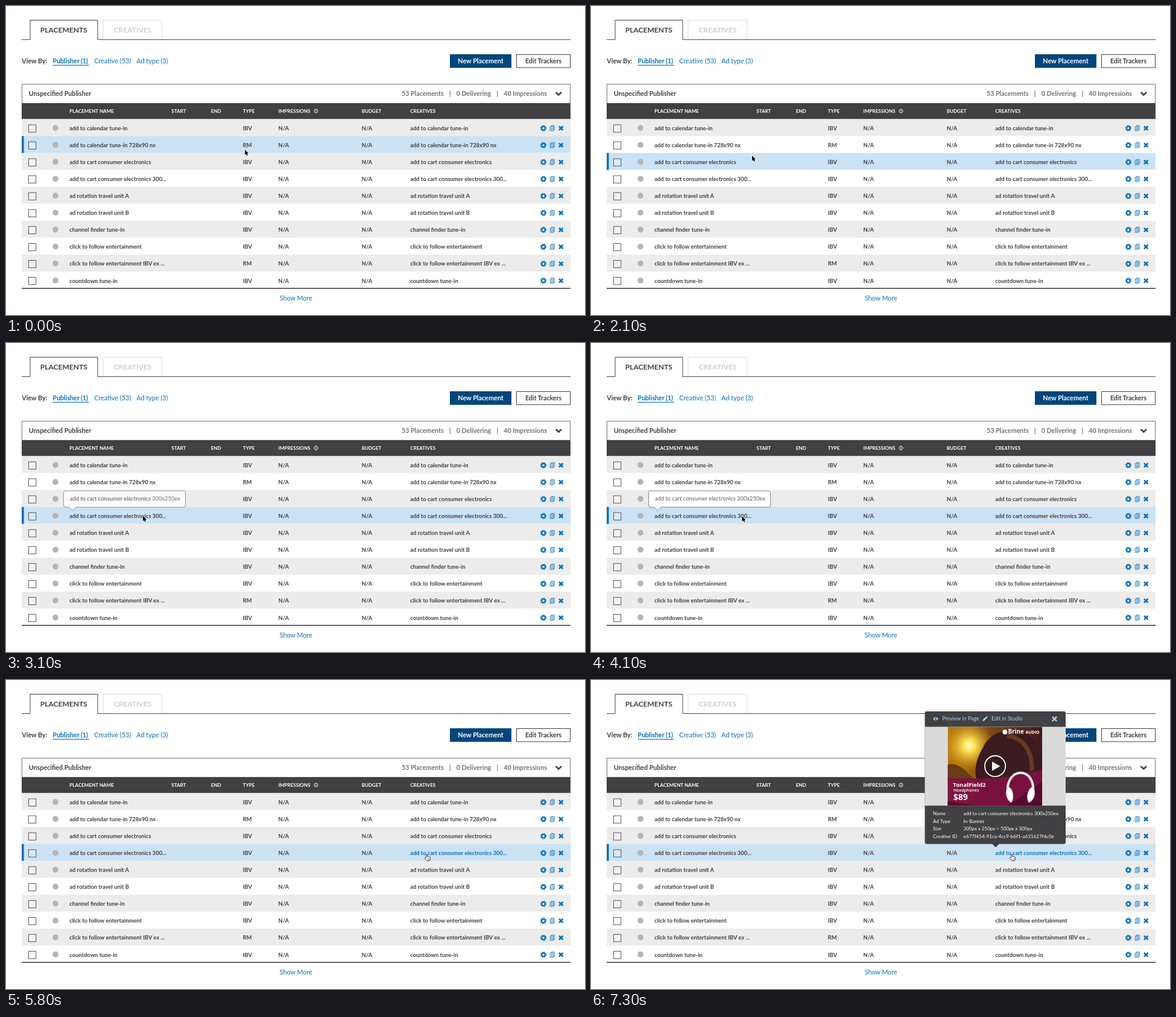
Recreate the animation shown at these times as an HTML page. Size 960 by 512 pixels, loop 7400 ms.

```html
<!DOCTYPE html>
<html lang="en">
<head>
<meta charset="utf-8">
<title>Placements</title>
<style>
html, body { margin: 0; width: 100%; height: 100%; overflow: hidden; background: #fff; }
svg { display: block; width: 960px; height: 512px; font-family: Lato, sans-serif; cursor: default; }
text { white-space: pre; }
.ad { font-family: "Open Sans", sans-serif; }
</style>
</head>
<body>
<svg id="stage" viewBox="0 0 960 512"></svg>
<script>
const INK = '#414042', BLUE = '#0a71b9', SKY = '#a5d4f5';
const TOP = 187.4, PITCH = 28.07, LOOP = 7400;

const names = [
  'add to calendar tune-in', 'add to calendar tune-in 728x90 nx',
  'add to cart consumer electronics', 'add to cart consumer electronics 300...',
  'ad rotation travel unit A', 'ad rotation travel unit B',
  'channel finder tune-in', 'click to follow entertainment',
  'click to follow entertainment IBV ex ...', 'countdown tune-in'
];
const fullName = 'add to cart consumer electronics 300x250ex';

const text = (x, y, s, size, fill = INK, weight = 700, extra = '') =>
  `<text x="${x}" y="${y}" font-size="${size}" font-weight="${weight}" fill="${fill}" ${extra}>${s}</text>`;
const rect = (x, y, w, h, fill, extra = '') =>
  `<rect x="${x}" y="${y}" width="${w}" height="${h}" fill="${fill}" ${extra}/>`;
const path = (d, stroke, width = 1, fill = 'none', extra = '') =>
  `<path d="${d}" stroke="${stroke}" stroke-width="${width}" fill="${fill}" ${extra}/>`;
const circle = (x, y, r, fill, extra = '') =>
  `<circle cx="${x}" cy="${y}" r="${r}" fill="${fill}" ${extra}/>`;
const cross = (x, y, r, color) =>
  path(`M${x - r} ${y - r}l${2 * r} ${2 * r}M${x + r} ${y - r}l${-2 * r} ${2 * r}`, color, 2.7);
const centered = 'text-anchor="middle"';

function pageTop() {
  return path('M26 55.7H40V23.5H152V55.7H936', INK) +
    path('M161 55V23.5H258.5V55', '#dcdcdc') +
    text(95.8, 44.4, 'PLACEMENTS', 12.05, INK, 700, centered) +
    text(210, 44.4, 'CREATIVES', 12.05, '#cfcfcf', 700, centered) +
    text(26.3, 94.6, 'View By:', 10.7) +
    text(77.6, 94.6, 'Publisher (1)', 10.6, BLUE) +
    rect(77.5, 97.6, 60, 1.2, BLUE) +
    text(146.2, 94.6, 'Creative (53)', 10.85, BLUE, 400) +
    text(216.3, 94.6, 'Ad type (3)', 10.85, BLUE, 400) +
    rect(736, 80, 102, 22.5, '#00457c') +
    text(787, 95, 'New Placement', 10.8, '#fff', 700, centered) +
    rect(846.5, 80.5, 89, 21.6, '#fff', `stroke="${INK}"`) +
    text(891, 95, 'Edit Trackers', 10.6, INK, 700, centered);
}

function tableHead() {
  const labels = [[105.3, 'PLACEMENT NAME'], [274.3, 'START'], [339.7, 'END'], [392.7, 'TYPE'],
    [451.5, 'IMPRESSIONS'], [589.7, 'BUDGET'], [670.2, 'CREATIVES']];
  const totals = [[656, '53 Placements'], [734.8, '|'], [746.7, '0 Delivering'], [813.4, '|'], [825.3, '40 Impressions']];
  return rect(26.5, 129.5, 909, 40, '#fff', 'stroke="#77777a"') +
    text(37.8, 149.2, 'Unspecified Publisher', 10.7) +
    totals.map(([x, s]) => text(x, 149.2, s, 10.7, '#737375')).join('') +
    path('M911.6 142.8l4.7 4.7 4.7-4.7', INK, 2.6) +
    rect(26, 160.8, 910, TOP - 160.8, INK) +
    labels.map(([x, s]) => text(x, 177.2, s, 8.07, '#fff')).join('') +
    circle(514, 174, 3.1, 'none', 'stroke="#fff" stroke-width=".9"') +
    path('M514 173.4v2.2M514 171.9v.9', '#fff', 1);
}

function rowIcons(y) {
  return circle(891, y, 3, 'none', `stroke="${BLUE}" stroke-width="2.3"`) +
    circle(891, y, 4.4, 'none', `stroke="${BLUE}" stroke-width="1.5" stroke-dasharray="1.8 1.655"`) +
    path(`M902.2 ${y - 2.8}h5.4v7.2h-5.4zM904 ${y - 2.8}v-1.6h5.4v7.2h-1.8M903.4 ${y - .8}h3M903.4 ${y + 1}h3M903.4 ${y + 2.7}h3`, BLUE, .8) +
    cross(920.2, y, 3.2, BLUE);
}

function row(name, i) {
  const y = TOP + i * PITCH, mid = y + 15.1, base = y + 18.5;
  return rect(26, y, 910, PITCH, i % 2 ? '#fff' : '#ececec', `id="bg${i}"`) +
    rect(37.5, mid - 5.6, 12.2, 12.2, '#fff', 'fill-opacity=".25" stroke="#58585a"') +
    circle(82, mid - .4, 4.9, '#b5b5b5') +
    text(105.3, base, name, 9.36) +
    text(392.7, base, i == 1 || i == 8 ? 'RM' : 'IBV', 9.36) +
    text(451.5, base, 'N/A', 9.36) +
    text(589.7, base, 'N/A', 9.36) +
    text(670.2, base, name, 9.36, INK, 700, `id="link${i}"`) +
    rowIcons(mid);
}

function tooltip() {
  return '<g id="tip">' +
    path('M98.5 245H294.5a3 3 0 0 1 3 3V269a3 3 0 0 1-3 3H116.5L110.5 277.5 104.5 272H98.5a3 3 0 0 1-3-3V248a3 3 0 0 1 3-3z', '#858587', 1, '#fff') +
    text(106, 261.4, fullName, 9.37, '#5c5c5e', 400) + '</g>';
}

function advert() {
  return '<g clip-path="url(#adBox)">' +
    rect(591.5, 77.5, 156.5, 131, 'url(#dusk)') +
    circle(627, 109, 42, 'url(#sun)') +
    path('M640 168C634 148 640 128 650 112 658 92 682 80 706 84 730 88 742 104 748 122V208H640z', 'none', 0, '#3a1b1f') +
    path('M690 92C716 96 732 116 731 150', '#69391f', 7) +
    path('M591 140C606 136 618 146 636 165H591z', 'none', 0, '#6b3a16') +
    path('M591 163L676 163 748 149V209H591z', 'none', 0, '#7c1140', 'opacity=".95"') +
    path('M591 201L640 208H591zM690 209L748 168V209z', 'none', 0, '#560b2e') +
    path('M691 188C686 144 737 141 733 187', '#f0e9ea', 4) +
    path('M692 177C700 180 702 196 697 203 689 200 685 184 692 177z', '#c8afb7', 1, '#fff') +
    path('M732 177C724 180 721 196 726 203 735 200 739 184 732 177z', '#c8afb7', 1, '#fff') +
    '</g><g class="ad">' +
    circle(686.3, 86.2, 4, '#fff') +
    text(691.5, 89.3, 'Brine', 9.8, '#fff') +
    text(720.5, 89.3, 'AUDIO', 7, '#fff') +
    text(600.3, 176.8, 'TonalField2', 9.6, '#fff') +
    text(600.8, 184.9, 'Headphones', 7, '#fff', 600) +
    text(600.8, 198.8, '$89', 14, '#fff') + '</g>' +
    circle(670, 142.7, 17.2, '#2b1c1f', 'fill-opacity=".75" stroke="#fff" stroke-width="1.8"') +
    path('M665 135.2L678.5 142.8 665 150.4z', 'none', 0, '#fff');
}

function popup() {
  const times = '<tspan font-style="italic">x</tspan>';
  const details = [['Name', fullName], ['Ad Type', 'In-Banner'],
    ['Size', `300px ${times} 250px &gt; 500px ${times} 300px`],
    ['Creative ID', 'e677f454-91ca-4cc9-b6f1-a631627f4c0e']];
  return '<g id="popup">' +
    rect(553.5, 52, 233.5, 219.7, INK, 'rx="3"') +
    path('M664.5 271L671 277.3 677.5 271z', 'none', 0, INK) +
    path('M567 64.3Q571.5 58.8 576 64.3 571.5 69.3 567 64.3z', 'none', 0, SKY) +
    circle(571.5, 64.2, 1.5, INK) +
    text(582.2, 67.4, 'Preview in Page', 8.85, SKY, 400) +
    path('M649.2 68.4l.8-2.8 4.7-4.7 2 2-4.7 4.7zM655.3 60.3l.9-.8 2 2-.9.8z', 'none', 0, SKY) +
    text(664, 67.4, 'Edit in Studio', 8.85, SKY, 400) +
    cross(768.5, 64.5, 3.6, SKY) +
    rect(553.5, 77.5, 233.5, 130.7, '#dadada') +
    advert() +
    details.map(([k, v], i) => {
      const y = 224 + i * 12.65;
      return text(567, y, k, 8.07, '#fff', 400) + text(617.5, y, v, 8.07, '#fff', 400);
    }).join('') + '</g>';
}

function cursors() {
  const arrow = 'M0 0V8.7L2 6.9 3.3 10 4.9 9.3 3.6 6.3H6.3z';
  const hand = 'M-1.2 6V.8Q-.2-.4.7.8V4Q1.7 3.2 2.5 4.3 3.5 3.7 4.2 4.8 5.4 4.4 5.5 5.7V8L4.5 11H-.4L-3.4 7Q-3.6 5.4-2.2 5.6z';
  return `<g id="arrow">${path(arrow, '#fff', 1.2, '#000', 'paint-order="stroke"')}</g>` +
    `<g id="hand">${path(hand, '#222', .9, '#fff')}${path('M.9 7v2.4M2.4 7v2.4M3.8 7v2.4', '#222', .5)}</g>`;
}

const stage = document.getElementById('stage');
stage.innerHTML = `<defs>
  <clipPath id="adBox">${rect(591.5, 77.5, 156.5, 130.7, '#000')}</clipPath>
  <linearGradient id="dusk"><stop stop-color="#b7780f"/><stop offset=".45" stop-color="#7a4a14"/><stop offset="1" stop-color="#40191f"/></linearGradient>
  <radialGradient id="sun"><stop stop-color="#fffbd0"/><stop offset=".22" stop-color="#ffe45a"/><stop offset="1" stop-color="#e9a40e" stop-opacity="0"/></radialGradient>
  </defs>` + pageTop() + tableHead() + names.map(row).join('') +
  rect(26, 467, 910, 1.6, INK) +
  text(480.8, 488, 'Show More', 10.75, BLUE, 400, centered) +
  rect(26, 0, 3.6, PITCH, BLUE, 'id="bar"') +
  tooltip() + popup() + cursors();

const el = id => document.getElementById(id);
const ramp = (t, a, b) => Math.min(1, Math.max(0, (t - a) / (b - a)));

// Pointer stops: time, x, y
const stops = [[0, 396, 238], [800, 389, 236.5], [1300, 357, 234.5], [1700, 318, 235], [2100, 267, 248],
  [2400, 235, 280], [2600, 227, 286.5], [4000, 227, 286.5], [4800, 415, 290.5],
  [5600, 648, 290], [5800, 698, 288.5], [LOOP, 698, 288.5]];

function pointer(t) {
  const i = stops.findIndex(s => s[0] > t);
  const [t0, x0, y0] = stops[i - 1], [t1, x1, y1] = stops[i];
  const k = (t - t0) / (t1 - t0);
  return [x0 + (x1 - x0) * k, y0 + (y1 - y0) * k];
}

function draw(now) {
  const t = Math.floor(now % LOOP / 100) * 100;
  const [x, y] = pointer(t);
  const active = Math.floor((y - TOP) / PITCH);
  const onLink = x >= 670;
  names.forEach((_, i) => {
    el('bg' + i).setAttribute('fill', i == active ? '#cbe2f5' : i % 2 ? '#fff' : '#ececec');
    el('link' + i).setAttribute('fill', onLink && i == active ? BLUE : INK);
  });
  el('bar').setAttribute('y', TOP + active * PITCH);
  el('tip').setAttribute('opacity', ramp(t, 2600, 3200) * (1 - ramp(t, 4800, 5100)));
  el('popup').setAttribute('opacity', ramp(t, 5900, 6400));
  for (const id of ['arrow', 'hand']) {
    el(id).setAttribute('transform', `translate(${x} ${y})`);
    el(id).setAttribute('visibility', (id == 'hand') == onLink ? 'visible' : 'hidden');
  }
}

let start;
function tick(now) {
  start ??= now;
  draw(now - start);
  requestAnimationFrame(tick);
}
draw(0);
requestAnimationFrame(tick);
</script>
</body>
</html>
```
